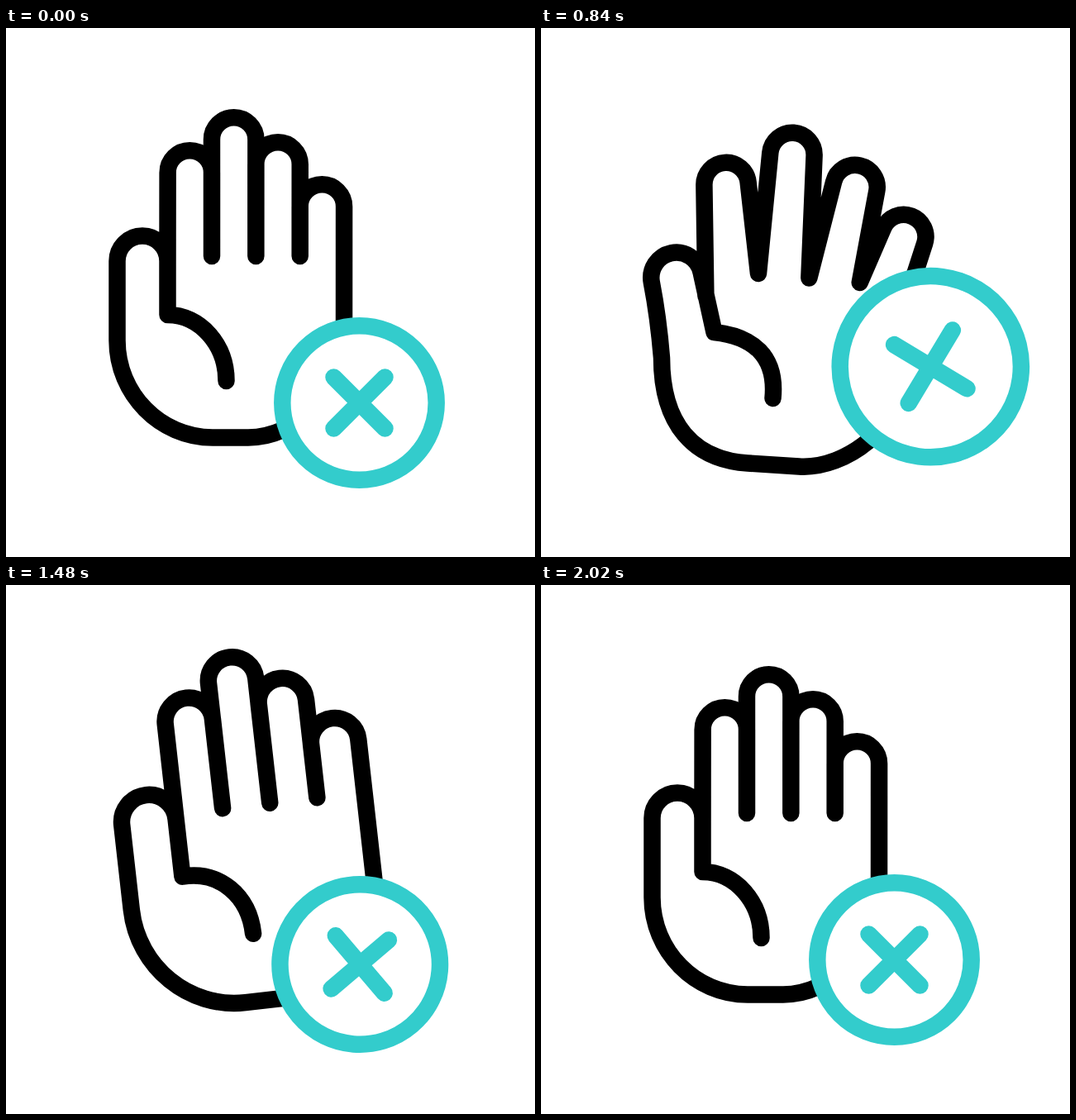
Animation, 640 px wide and 640 px high, one loop 2100 ms. Source, as an HTML page:

```html
<!DOCTYPE html>
<html lang="en">
<head>
<meta charset="utf-8">
<title>Raised hand</title>
<style>
  html, body { margin: 0; width: 100%; height: 100%; overflow: hidden; background: #fff; }
  svg { display: block; width: 100vw; height: 100vh; }
  path, circle {
    fill: none;
    stroke-width: 20.5;
    stroke-linecap: round;
    stroke-linejoin: round;
    vector-effect: non-scaling-stroke;
  }
  #hand { stroke: #000; }
  #badge { stroke: #33cccc; }
  #badge circle { fill: #fff; }
</style>
</head>
<body>
<svg viewBox="0 0 640 640">
  <path id="hand"/>
  <g id="badge">
    <circle r="93.2"/>
    <path d="M-31-31L31 31M31-31L-31 31"/>
  </g>
</svg>
<script>
const LOOP = 2100, STEP = 20;
const PIVOT = [249, 276];
const hand = document.getElementById('hand');
const badge = document.getElementById('badge');

// Key poses: time, x, y, turn, scale, finger spread.
const handKeys = [
  [0, 249, 276, 0, 1, 0],
  [300, 248, 297.5, 2.5, 0.98, 1],
  [520, 252, 299.5, 4.3, 0.98, 1],
  [840, 263, 297, 0, 1, 1],
  [1180, 260, 271, -14.2, 1.195, 0],
  [1280, 261, 275.5, -13.7, 1.19, 0],
  [1640, 263, 264, 0.6, 0.97, 0],
  [1680, 263.5, 259.5, 5.35, 0.904, 0],
  [2020, 249, 276, 0, 1, 0]];

// Key poses: time, x, y, turn, scale.
const badgeKeys = [
  [0, 427.5, 453.5, 0, 1],
  [300, 439, 404.3, -10.5, 1.13],
  [520, 452.7, 400.5, -13, 1.148],
  [840, 471.3, 409.7, -14, 1.176],
  [1080, 446, 467.5, 5, 1.1],
  [1280, 431, 465, 7.6, 1.066],
  [1680, 428, 453.7, 1.3, 1.016],
  [2020, 427.5, 453.5, 0, 1]];

// Smooth curve through the key poses, at rest at both ends.
function sample(keys, t) {
  const last = keys.length - 1;
  if (t >= keys[last][0]) return keys[last].slice(1);
  let i = 0;
  while (t >= keys[i + 1][0]) i++;
  const a = keys[i], b = keys[i + 1];
  const h = b[0] - a[0], u = (t - a[0]) / h, w = 1 - u;
  const slope = (k, n) => k === 0 || k === last ? 0
    : (keys[k + 1][n] - keys[k - 1][n]) / (keys[k + 1][0] - keys[k - 1][0]);
  return a.map((v, n) =>
    v * w * w * (1 + 2 * u) + b[n] * u * u * (3 - 2 * u)
    + h * u * w * (slope(i, n) * w - slope(i + 1, n) * u)).slice(1);
}

const shift = (p, x, y) => [p[0] + x, p[1] + y];
const middle = (p, q) => [(p[0] + q[0]) / 2, (p[1] + q[1]) / 2];

// Point at a distance from p; 0 degrees is up, positive leans right.
function reach(p, deg, len) {
  const a = deg * Math.PI / 180;
  return shift(p, len * Math.sin(a), -len * Math.cos(a));
}

function tangent(base, tip, r, side) {
  const x = tip[0] - base[0], y = tip[1] - base[1], d = Math.hypot(x, y);
  const a = Math.atan2(y, x) + side * Math.asin(Math.min(1, r / d));
  const len = Math.sqrt(Math.max(0, d * d - r * r));
  return shift(base, len * Math.cos(a), len * Math.sin(a));
}

// Round fingertip between two roots, ending at the right one.
function finger(left, tip, right, r) {
  const mid = middle(left, right);
  const a = Math.atan2(tip[1] - mid[1], tip[0] - mid[0]);
  const top = shift(tip, r * Math.cos(a), r * Math.sin(a));
  const arc = p => `A${r} ${r} 0 0 1 ${p}`;
  return `${tangent(left, tip, r, -1)}${arc(top)}${arc(tangent(right, tip, r, 1))}L${right}`;
}

// Spread fans the fingers out evenly; curl pulls the crease up.
function outline(spread, curl) {
  const lean = i => (8.5 * i - 4.5) * spread;
  const grow = 1 + 0.04 * spread;
  const gap = k => shift(PIVOT, (k - 1) * (53.35 + 8 * spread), (k - 1) * 5.5 * spread);

  const root = [195.5, 347];
  const joint = reach(root, lean(-1), 45);
  let d = `M${joint}`;
  [101, 141, 111, 60].forEach((len, i) => {
    const tip = reach(middle(gap(i), gap(i + 1)), lean(i), len * grow);
    d += 'L' + finger(i ? gap(i) : joint, tip, gap(i + 1), 26.7);
  });

  const round = 0.55 + 0.08 * spread;
  const right = [409 + 15 * spread, 380 + 19 * spread];
  const low2 = [293 + 5 * spread, 495.5 + 14 * spread];
  const low1 = [250 - 14 * spread, 495.5 + 10 * spread];
  const left = [134.5 - 2.5 * spread, 378];
  const side = [134.5 - 6.5 * spread, 340 - 11 * spread];
  const tilt = (low2[1] - low1[1]) / (low2[0] - low1[0]);
  const along = (p, x) => shift(p, x, x * tilt);
  d += `L${right}C${shift(right, 0, 60)} ${along(low2, 58)} ${low2}L${low1}`
    + `C${along(low1, round * (left[0] - low1[0]))} `
    + `${shift(left, 0, round * (low1[1] - left[1]))} ${left}`;

  const thumb = reach([165, 347], lean(-1), 65 * grow);
  d += `Q${side} ` + finger(side, thumb, root, 30.5);

  const crease = [266.5 + 2 * curl, 427 - 18 * curl];
  const bulge = 0.55 + 0.1 * Math.max(spread, curl);
  const bend = 5 * spread;
  return d + `C${shift(root, bulge * (crease[0] - root[0]), bend - 5 * curl)} `
    + `${shift(crease, bend, bulge * (root[1] - crease[1]))} ${crease}`;
}

function pose(el, [x, y, turn, scale], pivot = [0, 0]) {
  el.setAttribute('transform', `translate(${x} ${y}) rotate(${turn}) scale(${scale}) `
    + `translate(${-pivot[0]} ${-pivot[1]})`);
}

function draw(now) {
  const t = Math.floor((now % LOOP) / STEP) * STEP;
  const state = sample(handKeys, t);
  const [, , , scale, spread] = state;
  hand.setAttribute('d', outline(spread, Math.max(0, (scale - 1) / 0.19)));
  pose(hand, state, PIVOT);
  pose(badge, sample(badgeKeys, t));
}

const start = performance.now();
function tick() {
  draw(performance.now() - start);
  requestAnimationFrame(tick);
}
tick();
</script>
</body>
</html>
```
